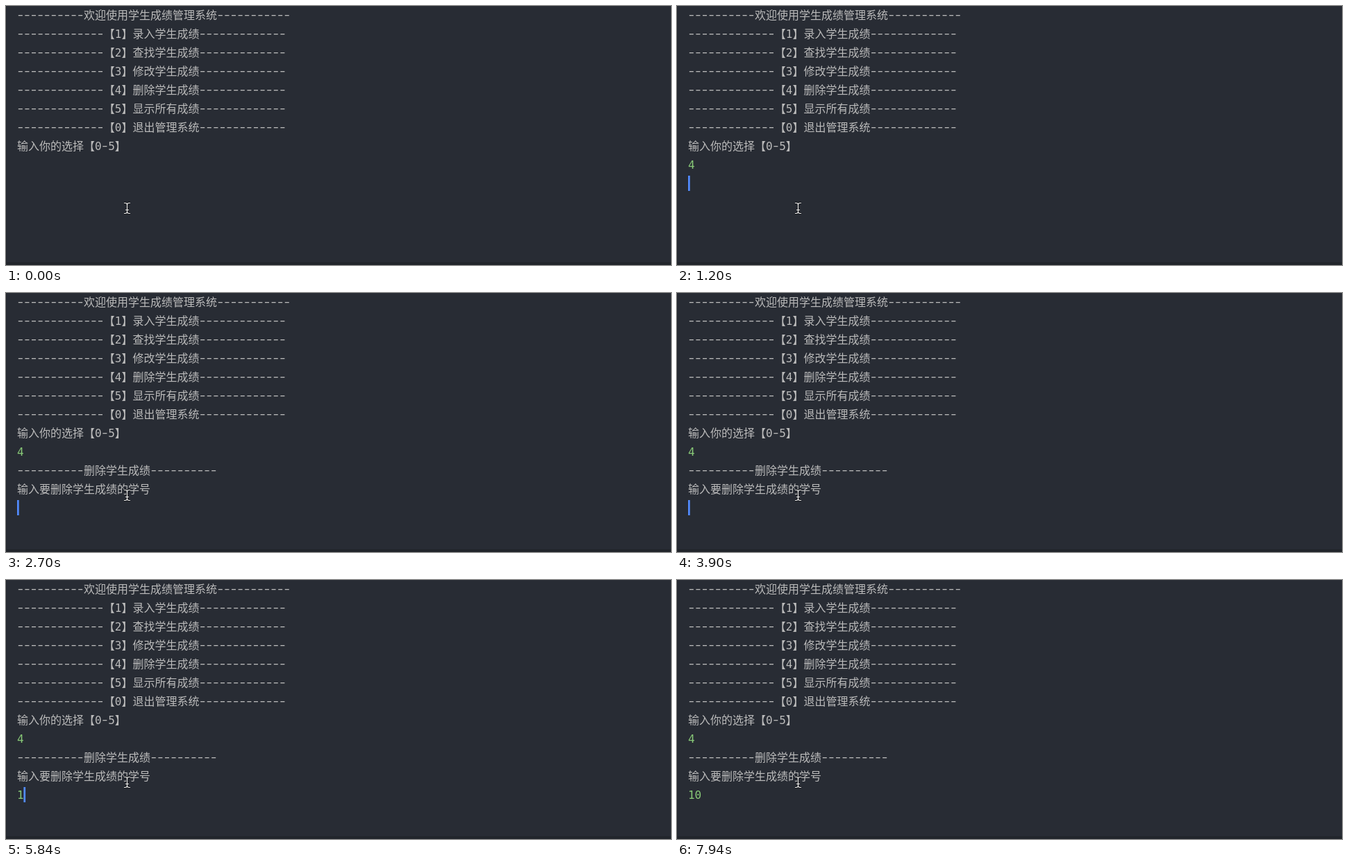
Write an HTML page with a canvas that moves like this. It is 958x374 px and loops after 8 s.

```html
<!DOCTYPE html>
<html lang="zh-CN">
<head>
<meta charset="utf-8">
<title>学生成绩管理系统</title>
<style>
html, body { margin: 0; width: 100%; height: 100%; overflow: hidden; background: #282c34; }
canvas { display: block; }
</style>
</head>
<body>
<canvas id="stage" width="958" height="374"></canvas>
<script>
const ctx = document.getElementById('stage').getContext('2d');
const LOOP = 8000, LEFT = 16, ROW = 27, CELL = 9.6, HAN = 16;
const GREY = '#bbbbbb', GREEN = '#89ca78', BLUE = '#528bff', EDGE = '#21252b';
const MONO = '16px "DejaVu Sans Mono", monospace';
const CJK = '16px "Noto Sans CJK SC", "Noto Sans CJK", sans-serif';

const dashes = n => '-'.repeat(n);
const item = (key, label) => dashes(13) + `【${key}】${label}` + dashes(13);
const menu = [
  dashes(10) + '欢迎使用学生成绩管理系统' + dashes(11),
  item(1, '录入学生成绩'),
  item(2, '查找学生成绩'),
  item(3, '修改学生成绩'),
  item(4, '删除学生成绩'),
  item(5, '显示所有成绩'),
  item(0, '退出管理系统'),
  '输入你的选择【0-5】'
];
const prompt = [dashes(10) + '删除学生成绩' + dashes(10), '输入要删除学生成绩的学号'];

// Caret visibility: [start, end, row, column]
const carets = [
  [300, 900, 8, 1],
  [1200, 1950, 9, 0], [2400, 2700, 9, 0],
  [2700, 3450, 11, 0], [3900, 4350, 11, 0], [4940, 5390, 11, 0],
  [5840, 6290, 11, 1],
  [6290, 6890, 11, 2], [7490, 7940, 11, 2]
];

function drawLine(text, row, color) {
  const base = 19 + row * ROW;
  let x = LEFT;
  ctx.fillStyle = color;
  for (const ch of text) {
    const narrow = ch < '\x7f';
    if (ch === '-') {
      ctx.fillRect(x + 1.8, base - 6, 6, 1.3);
    } else {
      ctx.font = narrow ? MONO : CJK;
      ctx.fillText(ch, x, base);
    }
    x += narrow ? CELL : HAN;
  }
}

function drawPointer() {
  const beam = new Path2D(
    'M170 284.5 H172 Q174 284.5 174.5 286.5 Q175 284.5 177 284.5 H179 ' +
    'M174.5 286 V298 M172 294.5 H177 ' +
    'M170 299.5 H172 Q174 299.5 174.5 297.5 Q175 299.5 177 299.5 H179');
  for (const [color, width] of [['#111317', 2.8], ['#f4f4f4', 1.2]]) {
    ctx.strokeStyle = color;
    ctx.lineWidth = width;
    ctx.stroke(beam);
  }
}

function draw(t) {
  ctx.fillStyle = '#282c34';
  ctx.fillRect(0, 0, 958, 374);
  ctx.fillStyle = EDGE;
  ctx.fillRect(0, 0, 1, 374);
  ctx.fillRect(0, 370, 958, 4);

  menu.forEach((line, i) => drawLine(line, i, GREY));
  if (t >= 300) drawLine('4', 8, GREEN);
  if (t >= 2700) prompt.forEach((line, i) => drawLine(line, 9 + i, GREY));
  if (t >= 5840) drawLine(t < 6290 ? '1' : '10', 11, GREEN);

  const caret = carets.find(([start, end]) => t >= start && t < end);
  if (caret) {
    const [, , row, column] = caret;
    ctx.fillStyle = BLUE;
    ctx.fillRect(LEFT + column * 9.4, 2 + row * ROW, 2.7, 22);
  }
  drawPointer();
}

const began = performance.now();
function tick() {
  draw((performance.now() - began) % LOOP);
  requestAnimationFrame(tick);
}
tick();
</script>
</body>
</html>
```
